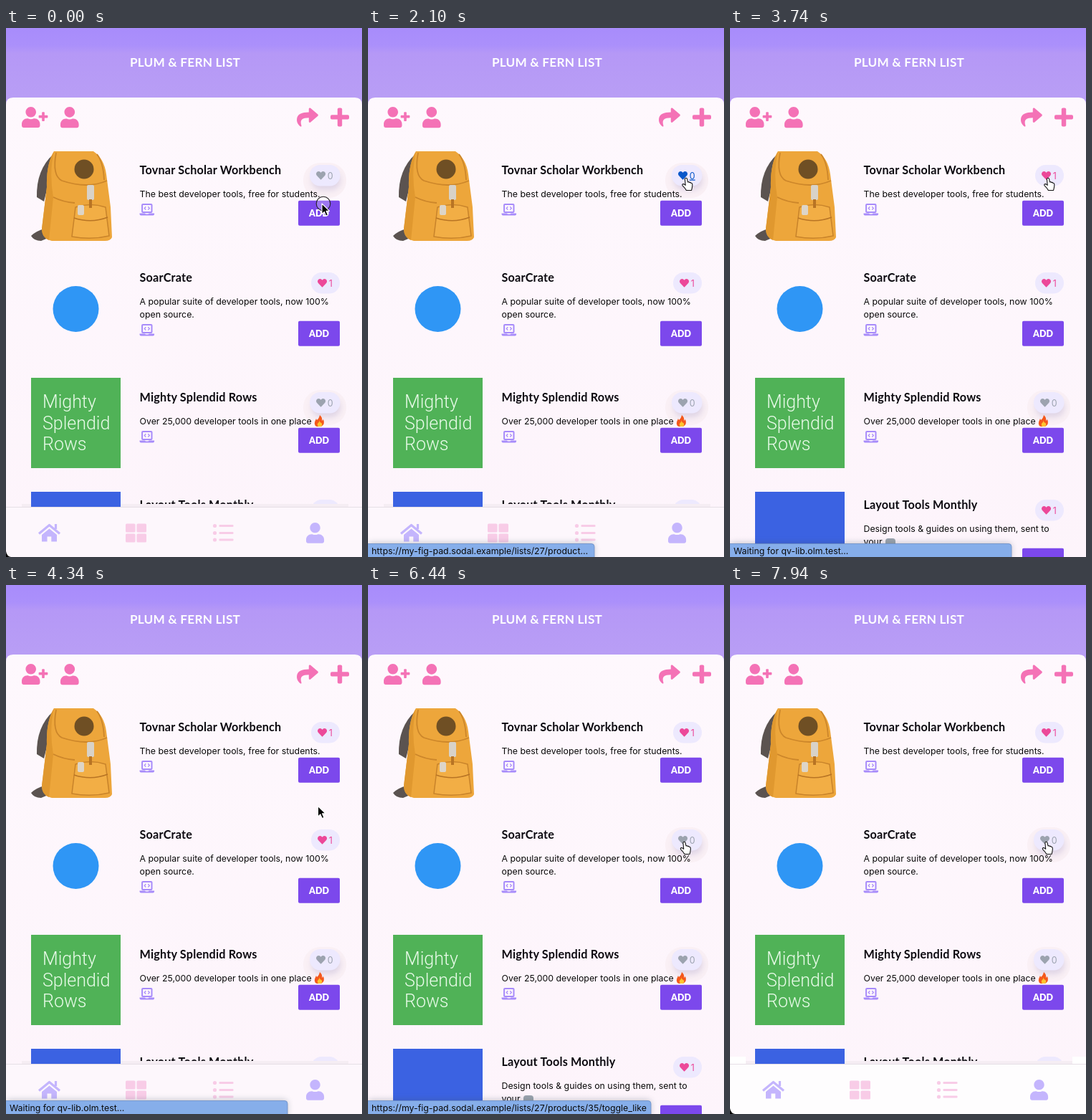
Animation, 497 px wide and 738 px high, one loop 8000 ms. Source, as an HTML page:

```html
<!DOCTYPE html>
<html lang="en">
<head>
<meta charset="utf-8">
<title>Shared list</title>
<style>
  html, body { margin: 0; width: 100%; height: 100%; overflow: hidden; background: #fef6fc; }
  svg { display: block; width: 100vw; height: 100vh; }
  text { font-family: Inter, "Open Sans", sans-serif; font-size: 12.35px; fill: #0a0a0a; white-space: pre; }
  .title { font: 700 16.2px Lato, "Open Sans", sans-serif; letter-spacing: .2px; fill: #0c0a10; }
  .head { font: 700 17.2px Lato, "Open Sans", sans-serif; letter-spacing: .2px; fill: #fff; text-anchor: middle; }
  .add { font: 900 12.5px Lato, "Open Sans", sans-serif; fill: #fff; text-anchor: middle; }
  .tile { font: 300 25px Roboto, sans-serif; fill: #e9fbe9; }
  .like text { font-size: 12.5px; fill: inherit; }
</style>
</head>
<body>
<svg id="stage" viewBox="0 0 497 738" xmlns="http://www.w3.org/2000/svg">
  <defs>
    <linearGradient id="sky" x2="0" y2="1">
      <stop offset="0" stop-color="#a88cfb"/>
      <stop offset=".22" stop-color="#ab90fb"/>
      <stop offset=".32" stop-color="#b598f6"/>
      <stop offset="1" stop-color="#b99ff5"/>
    </linearGradient>
    <linearGradient id="paper" x2="0" y2="1">
      <stop offset="0" stop-color="#fef8fd"/>
      <stop offset="1" stop-color="#fdf4fb"/>
    </linearGradient>
    <filter id="soft" x="-50%" y="-50%" width="200%" height="200%"><feGaussianBlur stdDeviation="4"/></filter>
    <path id="user" d="M224 256c70.7 0 128-57.3 128-128S294.7 0 224 0 96 57.3 96 128s57.3 128 128 128zm89.6 32h-16.7c-22.2 10.2-46.9 16-72.9 16s-50.6-5.8-72.9-16h-16.7C60.2 288 0 348.2 0 422.4V464c0 26.5 21.5 48 48 48h352c26.5 0 48-21.5 48-48v-41.6c0-74.2-60.2-134.4-134.4-134.4z"/>
    <path id="heart" d="M462 63C407 16 326 24 276 76l-20 20-20-20C186 24 105 16 50 63c-63 53-66 149-10 207l193 200c13 13 33 13 46 0l193-200c56-58 53-154-10-207z"/>
    <g id="laptop" fill="none" stroke="#a78bfa">
      <rect x="3.6" y="1" width="13.4" height="11" rx="1" stroke-width="2"/>
      <path d="M8.8 4.2 6.8 6.4l2 2.2M11.8 4.2l2 2.2-2 2.2" stroke-width="1.3"/>
      <path d="M0 13.4h7.5l1 1h3.6l1-1h7.5v1q0 2-2 2H2q-2 0-2-2z" fill="#a78bfa" stroke="none"/>
    </g>
    <path id="arrow" d="M0 0v14.6l3.4-3.2 2.5 5.7 2.6-1.1-2.5-5.6h4.6z" fill="#000" stroke="#fff" stroke-width="1.1" stroke-linejoin="round"/>
    <path id="hand" d="M-1.6 1.2Q-1.3-.4 0-.3 1.3-.2 1.6 1.3l.9 4.2q1.4-.9 2.2.5 1.5-.6 2.1.8 1.5-.3 1.9 1.4.5 3-.3 5.2l-.8 3.6H.4Q-1 14-4.9 10.3q-.8-1.3.4-2 1.3-.5 2.5.6l1.2 1z" fill="#fff" stroke="#111" stroke-width="1.1" stroke-linejoin="round"/>
  </defs>

  <rect width="497" height="110" fill="url(#sky)"/>
  <text class="head" x="250" y="54">PLUM &amp; FERN LIST</text>
  <path d="M0 738V107q0-10 10-10H487q10 0 10 10V738z" fill="url(#paper)"/>

  <g fill="#f472b6">
    <g transform="translate(22 110)scale(.0568)">
      <use href="#user"/>
      <rect x="416" y="208" width="224" height="64" rx="16"/>
      <rect x="496" y="128" width="64" height="224" rx="16"/>
    </g>
    <use href="#user" transform="translate(76 110)scale(.0572)"/>
    <path transform="translate(406 109.5)scale(.0583)" d="M504 190 328 38c-16-13-40-3-40 18v80C127 138 0 170 0 322c0 62 40 122 83 154 14 10 33-2 28-18C66 313 133 274 288 272v88c0 21 24 31 40 18l176-152c11-10 11-27 0-36z"/>
    <rect x="453" y="121.2" width="26" height="6.4" rx="2"/>
    <rect x="462.800" y="111.400" width="6.4" height="26" rx="2"/>
  </g>

  <g id="ghost">
    <path d="M434 325h17v16h-17zM291 355h161v313H291z" fill="#fdf0f7"/>
    <path d="M291 467h161v12H291zM291 625h161v12H291z" fill="#fff"/>
  </g>

  <g id="bag">
    <path d="M66 176Q42 198 43 236l10 6 10-40z" fill="#5b5350"/>
    <path d="M54 280Q42 283 35 290q4 7 14 7l12-5z" fill="#5b5350"/>
    <path d="M67 172H122Q137 182 140 204L146 250 148 292q-2 5-10 5H64Q50 294 50 280L57 222Q56 190 67 172z" fill="#eda63b"/>
    <path d="M67 172Q56 190 57 222L50 280q0 12 10 16l6-60q-6-34 1-64z" fill="#e0982f"/>
    <path d="M70 174Q64 206 78 213q36 12 63 0M66 236q14 7 30 8M127 176q9 12 10 36" fill="none" stroke="#cc862a" stroke-width="1.800"/>
    <path d="M97 250q21-7 42 0l5 40q-25 6-52 1z" fill="#f2ae45" stroke="#c8832a" stroke-width="1.500"/>
    <path d="M95 265q24 8 47-1" fill="none" stroke="#b87424" stroke-width="1.500"/>
    <circle cx="109" cy="197" r="13.500" fill="#6f4f24"/>
    <rect x="113" y="219" width="10" height="21" rx="2" fill="#d8d2c8"/>
    <rect x="116" y="239" width="4" height="12" fill="#b87424"/>
    <rect x="100" y="247" width="9" height="14" rx="2" fill="#ddd5c8"/>
  </g>
  <circle cx="97.5" cy="392" r="32" fill="#2f96f5"/>
  <rect x="35" y="488" width="125" height="126" fill="#50b257"/>
  <g id="tileText"></g>
  <rect x="35" y="647" width="125" height="125" fill="#3b62e2"/>

  <g id="rows"></g>
  <path d="M438 540q-1 5-4 7l-1-2q-5 9 1 11h6q6-3 3-10l-2 2q1-5-3-8z" fill="#f4581c"/>
  <path d="M437.5 547q0 3-2 4-2 4 1 5h3q3-2 1-5-3-1-3-4z" fill="#fdc52f"/>
  <path d="M217 721v-5q0-4 4-4h6q4 0 4 4v5z" fill="#9aa3ad"/>

  <g id="nav">
    <path d="M22 664h13v4H22zM160 664h318v4H160z" fill="#f5edf3"/>
    <path id="strips" d="M0 658h22v10H0zM478 658h19v10h-19z" fill="#fff"/>
    <rect id="navBack" y="668" width="497" height="70"/>
    <rect y="668" width="497" height="1" fill="#e6dfe6"/>
    <g fill="#c4b5fd">
      <path d="M60.5 698.5 50 707v9.5h7.5V709.5h5.800v7H71V707z"/>
      <path d="M46 705.5 60.5 693.5 75 705.5M69.500 692v7" fill="none" stroke="#c4b5fd" stroke-width="3.2" stroke-linejoin="round"/>
      <use href="#user" transform="translate(419 690)scale(.056)"/>
    </g>
    <g id="navPink" fill="#f8cce7"></g>
    <path d="M0 730v8h7q-6-1-7-8z" fill="#000"/>
  </g>

  <g id="bar">
    <rect id="barShade" y="718" height="24" rx="5" fill="#456" opacity=".3" filter="url(#soft)"/>
    <path id="barBox" fill="#86aeea" stroke="#6c8fc4" stroke-width=".8"/>
    <text id="barText" x="5" y="734"></text>
  </g>
  <circle id="ring" cx="443" cy="245" r="9.8" fill="#fff" fill-opacity=".25" stroke="#222" stroke-width="1.1"/>
  <use id="cursor"/>
</svg>
<script>
const LOOP = 8000;
const $ = id => document.getElementById(id);
const show = (el, on) => el.setAttribute('visibility', on ? 'visible' : 'hidden');

const rows = [
  { y: 198, title: 'Tovnar Scholar Workbench', lines: ['The best developer tools, free for students.'] },
  { y: 348, title: 'SoarCrate', lines: ['A popular suite of developer tools, now 100%', 'open source.'] },
  { y: 515, title: 'Mighty Splendid Rows', lines: ['Over 25,000 developer tools in one place'] },
  { y: 665, title: 'Layout Tools Monthly', lines: ['Design tools &amp; guides on using them, sent to', 'your'] }
];

function rowMarkup({ y, title, lines }) {
  const extra = (lines.length - 1) * 18;
  const top = y + 42.8 + extra;
  const desc = lines.map((line, i) => `<text x="186.5" y="${y + 38 + i * 18}">${line}</text>`).join('');
  return `<text class="title" x="186.5" y="${y + 6}">${title}</text>
    <g class="like" transform="translate(446 ${y + 8})">
      <g class="halo">
        <rect x="-31" y="-18" width="60" height="49" rx="24" fill="#faf0f5"/>
        <rect x="-19" y="-7" width="40" height="27" rx="13.5" fill="#7d6fae" opacity=".22" filter="url(#soft)"/>
      </g>
      <rect class="pill" x="-20" y="-15" width="40" height="29.5" rx="14.75" fill="#ede9fe"/>
      <g class="mark">
        <use href="#heart" transform="translate(-11 -6.8)scale(.0256)"/>
        <text x="4.8" y="4.5"></text>
      </g>
    </g>${desc}
    <use href="#laptop" x="186.5" y="${y + 47 + extra}"/>
    <rect x="408" y="${top}" width="58" height="35" rx="2" fill="#7c48ec"/>
    <text class="add" x="437" y="${top + 22}">ADD</text>`;
}

$('rows').innerHTML = rows.map(rowMarkup).join('');
$('tileText').innerHTML = ['Mighty', 'Splendid', 'Rows']
  .map((word, i) => `<text class="tile" x="51" y="${530 + i * 29.5}">${word}</text>`).join('');

const box = (x, y, w, h, r) => `<rect x="${x}" y="${y}" width="${w}" height="${h}" rx="${r}"/>`;
let pink = '';
for (const x of [167, 182.5]) for (const y of [691.5, 705.5]) pink += box(x, y, 13.5, 12, 1.6);
for (const y of [694.5, 704.5, 714]) {
  pink += `<circle cx="291.5" cy="${y}" r="2.6"/>` + box(297.5, y - 1.6, 20, 3.2, 1);
}
$('navPink').innerHTML = pink;

const likes = [...document.querySelectorAll('.like')].map(g => ({
  halo: g.querySelector('.halo'), pill: g.querySelector('.pill'),
  mark: g.querySelector('.mark'), count: g.querySelector('text')
}));

function setLike(i, on, hover) {
  const { halo, pill, mark, count } = likes[i];
  show(halo, !on);
  pill.setAttribute('x', on ? -20 : -22);
  pill.setAttribute('width', on ? 40 : 42.5);
  mark.setAttribute('transform', `translate(${on ? 0 : -2} 0)`);
  mark.setAttribute('fill', hover ? '#0a58ca' : on ? '#ec4899' : '#9ca3af');
  count.textContent = on ? 1 : 0;
  count.setAttribute('text-decoration', hover ? 'underline' : 'none');
}

// last entry whose start time has passed
const at = (steps, t) => steps.filter(s => s[0] <= t).pop();

// start, x, y, shape
const pointer = [
  [0, 441, 245, 'arrow'], [150, 440, 224, 'arrow'], [300, 439, 206, 'arrow'],
  [900, 438, 200, 'arrow'], [1050, 438, 197, 'arrow'],
  [1500, 442.5, 209, 'hand'], [1800, 444, 209.5, 'hand'],
  [4340, 435.5, 308.5, 'arrow'], [4490, 437, 322, 'arrow'], [4640, 439, 338, 'arrow'],
  [4790, 441, 352, 'hand'], [4940, 441, 356, 'hand'], [5240, 441.5, 358.5, 'hand']
];

const link = 'https://my-fig-pad.sodal.example/lists/27/products/';
const shortLink = link.slice(0, -2) + '…';
const wait = 'Waiting for qv-lib.olm.test...';
const fullLink = link + '35/toggle_like';

// start, width, opacity, text
const status = [
  [0, 316, 0, ''], [1650, 316, .35, shortLink], [1800, 316, .7, shortLink], [1950, 316, 1, shortLink],
  [3150, 316, 1, wait], [3300, 358, 1, wait], [3450, 393, 1, wait],
  [4940, 395, 1, fullLink], [6740, 395, .5, fullLink], [6890, 395, 0, '']
];

function render(t) {
  const [, x, y, shape] = at(pointer, t);
  $('cursor').setAttribute('href', '#' + shape);
  $('cursor').setAttribute('transform', `translate(${x} ${y})`);
  show($('ring'), t < 150);

  const [, width, opacity, label] = at(status, t);
  $('bar').setAttribute('opacity', opacity);
  $('barShade').setAttribute('width', width);
  $('barBox').setAttribute('d', `M-1 719.5H${width - 4}q4 0 4 4V739H-1z`);
  $('barText').textContent = label;

  setLike(0, t >= 3740, t >= 1500 && t < 3740);
  setLike(1, t < 6440, t >= 4790 && t < 6440);
  setLike(2, false, false);
  setLike(3, true, false);

  const navHidden = (t >= 3740 && t < 4340) || (t >= 6440 && t < 6740);
  $('nav').setAttribute('display', navHidden ? 'none' : 'inline');
  $('navBack').setAttribute('fill', t >= 6740 ? '#fefdfe' : '#fdf7fc');
  show($('strips'), t >= 6740);
  show($('ghost'), t >= 5240 && t < 6440);
}

const start = performance.now();
function tick() {
  render((performance.now() - start) % LOOP);
  requestAnimationFrame(tick);
}
tick();
</script>
</body>
</html>
```
